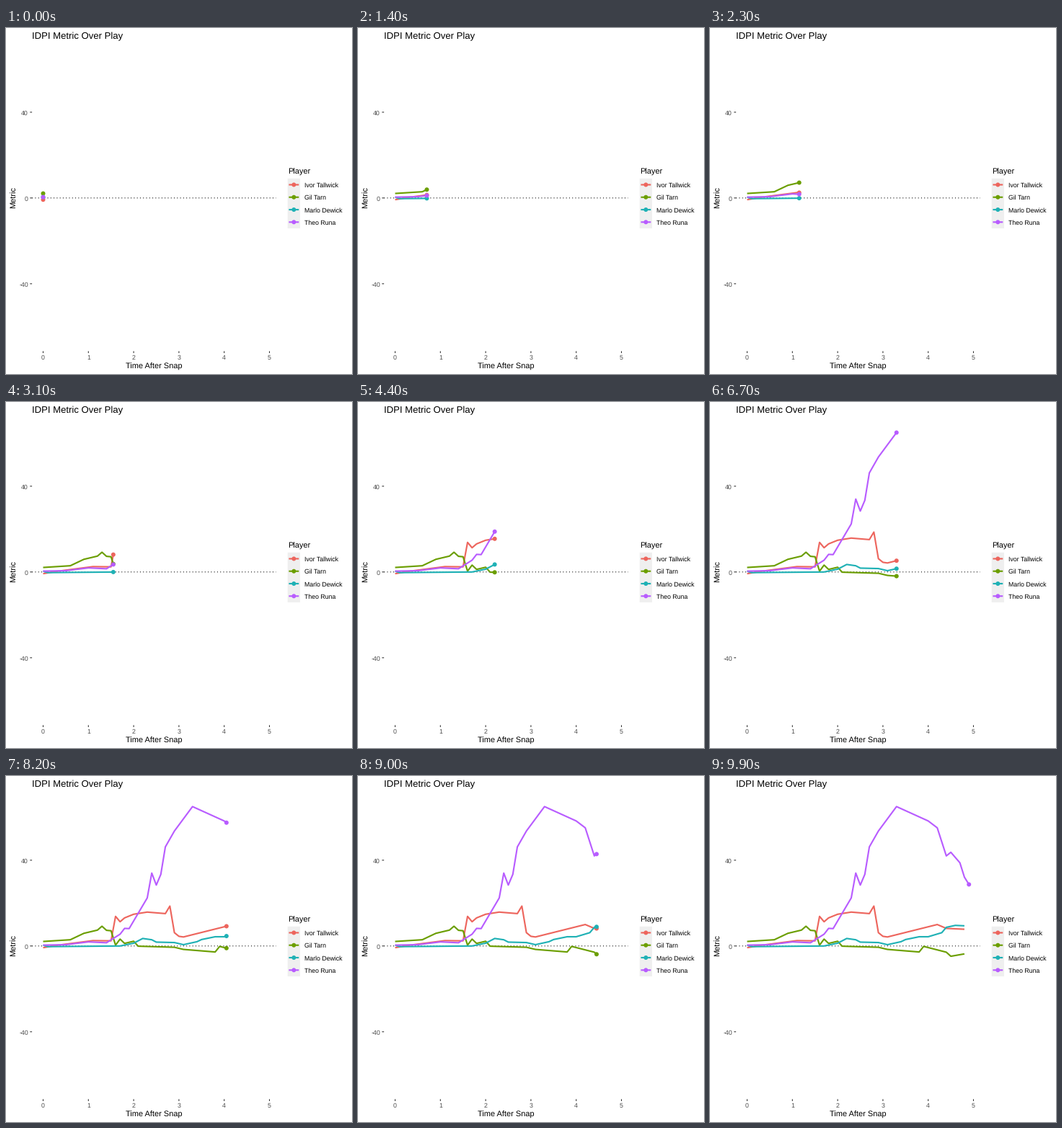
Animation of 480 by 480 pixels, one loop 10 s. Source, as a matplotlib script:

```python
import numpy as np
import matplotlib.pyplot as plt
from matplotlib.animation import FuncAnimation
from matplotlib.patches import Circle, Rectangle

SIZE, DPI, FRAMES = 480, 96, 100
PX = 72 / DPI  # points per pixel
LAST, STEP = 4.9, 0.1  # seconds of play, sampling step

plt.rcParams.update({
    "font.family": "Liberation Sans",
    "text.hinting": "none",
    "path.snap": False,
    "lines.solid_joinstyle": "round",
    "lines.solid_capstyle": "butt",
    "lines.dash_capstyle": "butt",
})

# Name, colour and turning points (seconds, metric)
PLAYERS = [
    ("Ivor Tallwick", "#ED655D", [
        (0, -.8), (.3, .3), (1.1, 2.5), (1.5, 2.4), (1.6, 13.8), (1.7, 11.3),
        (1.8, 13.1), (2, 14.8), (2.3, 15.8), (2.7, 15.1), (2.8, 18.6),
        (2.9, 6.2), (3, 4.5), (3.1, 4.2), (4.2, 10), (4.4, 8.2), (4.8, 7.8)]),
    ("Gil Tarn", "#6B9E00", [
        (0, 2.1), (.6, 2.9), (.9, 5.9), (1.2, 7.4), (1.3, 9.2), (1.4, 7.3),
        (1.5, 7.1), (1.6, .4), (1.7, 3.2), (1.8, 1.2), (2, 2.2), (2.1, -.1),
        (2.9, -.6), (3.1, -1.6), (3.8, -2.8), (3.9, -.2), (4.4, -2.9),
        (4.5, -4.8), (4.8, -3.7)]),
    ("Marlo Dewick", "#1FB1B5", [
        (0, .4), (.1, -.3), (1.7, 0), (2, 1.3), (2.2, 3.5), (2.4, 2.9),
        (2.5, 1.8), (2.9, 1.6), (3.1, .6), (3.4, 2), (3.5, 3), (3.8, 4.3),
        (4, 4.3), (4.3, 6.2), (4.4, 8.7), (4.6, 9.6), (4.8, 9.4)]),
    ("Theo Runa", "#B85CFF", [
        (0, .4), (.5, .6), (1, 1.9), (1.4, 1.5), (1.7, 5.5), (1.8, 8.2),
        (1.9, 8.1), (2.3, 22.4), (2.4, 34), (2.5, 28.4), (2.6, 33.4),
        (2.7, 46.2), (2.9, 53.6), (3.3, 65), (4, 58.3), (4.2, 55.1),
        (4.4, 42), (4.5, 43.7), (4.7, 38.8), (4.8, 32.1), (4.9, 28.7)]),
]


def to_x(t):
    return 51.5 + 62.8 * np.asarray(t)


def to_y(v):
    return 235.8 - 2.975 * np.asarray(v)


fig = plt.figure(figsize=(SIZE / DPI, SIZE / DPI), dpi=DPI, facecolor="white")
ax = fig.add_axes([0, 0, 1, 1])
ax.set(xlim=(0, SIZE), ylim=(SIZE, 0))
ax.axis("off")


def text(x, y, s, size, color="black", ha="left", rotation=0):
    ax.text(x, y, s, fontsize=size * PX, color=color, ha=ha, va="baseline",
            rotation=rotation, rotation_mode="anchor")


def stroke(xs, ys, color, width, **kw):
    return ax.plot(xs, ys, color=color, lw=width * PX, **kw)[0]


def dot(x, y, color):
    return ax.add_patch(Circle((x, y), 3, fc=color, lw=0, zorder=4))


def draw_axes():
    text(36, 15, "IDPI Metric Over Play", 13.15)
    text(205.2, 473, "Time After Snap", 11, ha="center")
    text(13.5, 235, "Metric", 11, ha="center", rotation=90)
    for t in range(6):
        x = to_x(t)
        stroke([x, x], [448.3, 451], "#333333", 1.07)
        text(x, 460, str(t), 8.8, "#4D4D4D", "center")
    for v in (-40, 0, 40):
        y = to_y(v)
        stroke([33.3, 36.1], [y, y], "#333333", 1.07)
        text(31, y + 3.7, str(v), 8.8, "#4D4D4D", "right")
    stroke([36.1, 374.6], to_y([0, 0]), "black", 1.07, ls=(0, (1, 3)), zorder=1)


def draw_legend():
    left, top, key = 390.7, 208.8, 17.28
    text(left, 203, "Player", 11)
    ax.add_patch(Rectangle((left, top), key, 4 * key, fc="#EFEFEF", lw=0))
    for i, (name, color, _) in enumerate(PLAYERS):
        y = top + (i + .5) * key
        stroke([left + .1 * key, left + .9 * key], [y, y], color, 2.13)
        dot(left + key / 2, y, color)
        text(413.7, y + 3.5, name, 8.8)


def sample(points):
    """Times, values and frame numbers of a player's regular samples."""
    ts, vs = np.transpose(points)
    t = np.arange(round(ts[-1] / STEP) + 1) * STEP
    return t, np.interp(t, ts, vs), np.round(t / LAST * (FRAMES - 1))


draw_axes()
draw_legend()
tracks = [sample(points) for _, _, points in PLAYERS]
lines = [stroke([], [], c, 2.13, zorder=3) for _, c, _ in PLAYERS]
dots = [dot(0, 0, c) for _, c, _ in PLAYERS]


def update(n):
    for (t, v, keys), line, point in zip(tracks, lines, dots):
        # Reveal up to the present moment; a finished player loses the dot
        at = np.append(keys[keys < n], min(n, keys[-1]))
        xs = to_x(np.interp(at, keys, t))
        ys = to_y(np.interp(at, keys, v))
        line.set_data(xs, ys)
        point.center = xs[-1], ys[-1]
        point.set_visible(bool(n <= keys[-1]))
    return lines + dots


anim = FuncAnimation(fig, update, frames=FRAMES, interval=100,
                     repeat=True, repeat_delay=0, blit=False)
plt.show()
```
